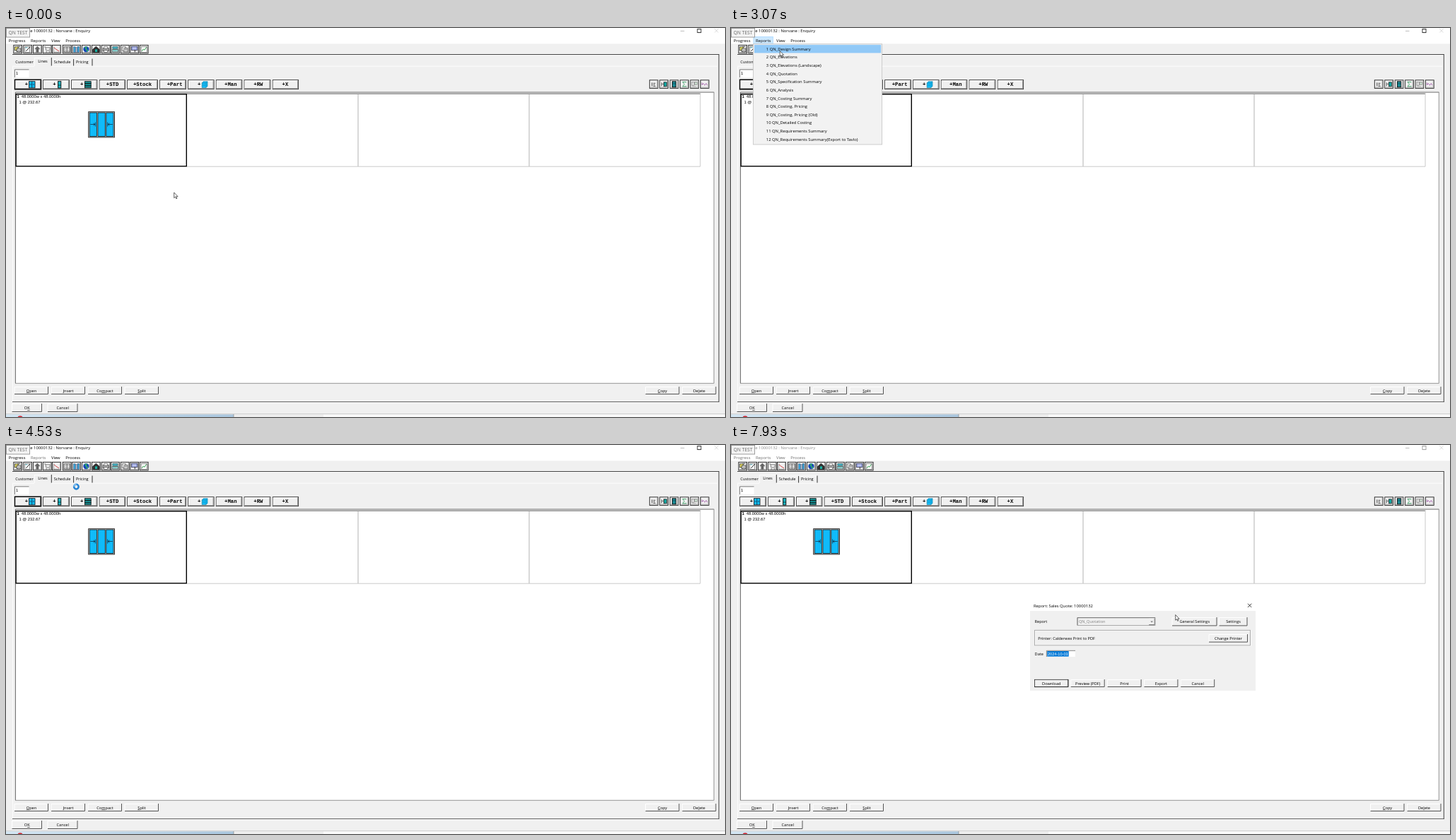
Recreate the animation shown at these times as an HTML page. Size 1017x551 px, loop 8 s.

```html
<!DOCTYPE html>
<html lang="en">
<head>
<meta charset="utf-8">
<title>Enquiry lines</title>
<style>
html, body { margin: 0; width: 100%; height: 100%; overflow: hidden; background: #fff; }
svg { display: block; width: 1017px; height: 551px; }
text { font-family: "Open Sans", "Noto Sans", sans-serif; font-size: 5.85px; white-space: pre; fill: #000; }
.ui { font-size: 5.6px; }
.cell { font-family: "Liberation Sans", Arial, sans-serif; font-size: 5.8px; }
.mono { font-family: "Liberation Mono", monospace; font-size: 7.3px; font-weight: 700; }
.mid { text-anchor: middle; }
.u { text-decoration: underline; }
.off .title { fill: #8a8a8a; }
.off .menu, .busy #reports { fill: #6d6d6d; }
.off #max { stroke: #999; }
.off #focus { visibility: hidden; }
</style>
</head>
<body>
<svg id="stage" viewBox="0 0 1017 551"></svg>
<script>
const FACE = '#f0f0f0', DARK = '#555', CYAN = '#10bbfa', TEAL = '#12a5a0';

const rect = (x, y, w, h, fill, stroke = 'none', sw = 1) =>
  `<rect x="${x}" y="${y}" width="${w}" height="${h}" fill="${fill}" stroke="${stroke}" stroke-width="${sw}"/>`;
const path = (d, stroke, sw = 1, fill = 'none') =>
  `<path d="${d}" stroke="${stroke}" stroke-width="${sw}" fill="${fill}"/>`;
const text = (x, y, s, cls = '', more = '') => `<text x="${x}" y="${y}" class="${cls}" ${more}>${s}</text>`;
const group = (id, body) => `<g id="${id}">${body}</g>`;
const at = (x, y, body) => `<g transform="translate(${x} ${y})">${body}</g>`;

// An underscore in a label marks its shortcut letter.
const button = (x, y, w, h, label) => rect(x, y, w, h, FACE) +
  path(`M${x} ${y + h}V${y + .5}H${x + w}`, '#fff') +
  path(`M${x} ${y + h - .5}H${x + w - .5}V${y}`, DARK) +
  text(x + w / 2, y + h / 2 + 2, label.replace(/_(.)/, '<tspan class="u">$1</tspan>'), 'ui mid');

const addButton = (x, w, label, tx) => rect(x + .6, 73.6, w - 1.2, 13, FACE, '#333', .9) +
  path(`M${x + 1.5} 86V74.6H${x + w - 1.5}`, '#fff', .8) +
  path(`M${x + 1.5} 85.7H${x + w - 1.6}V74.5`, '#777', .8) +
  text(tx, 82.3, label, 'mono');

const icon = (x, y, body) => at(x, y,
  rect(.5, .5, 11.8, 11.6, FACE, '#222', .9) + path('M1.5 10.8H11.4V1.5', '#999', .8) + body);

const glyphs = [
  rect(2, 3, 5, 5, '#e8df6a', '#222', .7) + rect(5, 5.2, 5.5, 4.6, '#fff', '#222', .8) + path('M6 2.5H10M6.3 7.5H9.5', '#222', .8),
  rect(2.5, 2.5, 6.5, 8, '#fff', '#555', .6) + path('M4 9L10 2.5', '#222', 1) + path('M3 4H6', '#29a', .8),
  path('M6.4 2L10 6H8V10.5H4.8V6H2.8Z', '#555', .4, '#666'),
  path('M2 3H4L5 8H10L10.5 4H4.4', '#666', .8) + path('M5 10H6M9 10H10', '#444', 1.2),
  path('M2.5 2.5V10.5H10.5', '#777', .7) + path('M3 4L6 6.5L10 9', '#c33', .9),
  rect(2.2, 3, 8.4, 7, '#fff', '#333', .8) + path('M6.4 3V10M3 5H10M3 7.5H10', '#333', .6),
  rect(2.3, 3, 2.6, 7.5, '#3aa9dd', '#346', .5) + rect(5.2, 4, 2.4, 6.5, '#bcd', '#346', .5) + rect(7.9, 2.5, 2.6, 8, '#3aa9dd', '#346', .5),
  '<circle cx="6.4" cy="6.3" r="4.2" fill="#1646b8"/>' + path('M4 4L7 3.5L6 6L8.5 8L7 9.5', '#33b06c', 1.5),
  path('M1.8 6.5L6.4 2.4L11 6.5V10.6H1.8Z', '#111', .8, '#333') + rect(5, 6.5, 3, 3.6, '#19b3a6'),
  rect(2.3, 5, 8.2, 4, '#aaa', '#333', .7) + rect(4, 2.4, 4.8, 2.8, '#fff', '#444', .6) + rect(4, 8, 4.8, 2.5, '#fff', '#444', .6),
  rect(2.8, 2.5, 7.2, 3, '#49b6c9', '#244', .6) + rect(2.2, 6.5, 8.4, 3.6, '#eee', '#244', .7) + path('M3 8.2H9.7', TEAL, 1),
  rect(2.5, 3, 5, 5.5, '#fff', '#444', .7) + rect(5, 5, 5.3, 5, '#ddd', '#444', .7) + path('M6 7H9.5', '#444', .6),
  rect(2.2, 2.3, 8.4, 5.3, '#8794df', '#334', .7) + path('M3.5 4.2H9.3M3.5 6H9.3', '#fff', .7) + path('M7 7V10.5', '#333', 1),
  rect(2.4, 2.5, 8, 8, '#fff', '#555', .6) + path('M3.5 9L5.5 6L7 7.5L9.7 3.5', '#2a9a46', 1)
];
const glyphX = [10.3, 24.3, 38, 51.8, 65, 79.8, 93.2, 107, 121, 134.8, 148, 161.8, 175.3, 188.8];

const sideGlyphs = [
  path('M4 4V9M5.8 5H8.6M5.8 7H8M5.8 9H8.8', '#333', .9),
  path('M3.2 4V9M4 6H6', '#333', .8) + rect(6.2, 3.5, 4, 6, TEAL, '#111', .7),
  rect(3.8, 2.5, 5.2, 8, '#1b9fa8', '#111', 1) + path('M4 5.5H9M6.4 3V10', '#134', .6),
  path('M8.8 4V3.2H4L6.5 6.3L4 9.5H9V8.6', '#2b9a5a', .8),
  rect(2.5, 3.2, 3.4, 5, '#ddd', '#777', .6) + rect(7, 3.2, 3, 4, '#cfe6d4', '#777', .6) + path('M3 9.5H9', '#888', .6),
  path('M2.5 4V7.5L4.5 5L6.5 8L8.5 5L10 8', '#a05aa8', .8)
];

const frame = () => rect(0, 0, 1017, 551, FACE) + rect(0, 0, 1017, 22.3, '#fff') +
  text(34.3, 6.2, 'e 10000132 : Norvane : Enquiry', 'title') +
  path('M954 4.3H959.5', '#aaa', .8) +
  '<rect id="max" x="978" y="1.5" width="5" height="5" fill="none" stroke="#222" stroke-width=".9"/>' +
  path('M1002.3 1.2L1007.5 6.4M1007.5 1.2L1002.3 6.4', '#ccc', .7) +
  group('menuHot', rect(31.9, 12.4, 27.4, 9.9, '#cce8ff', '#99d1ff', .6)) +
  text(3.8, 19.6, 'Progress', 'menu') + text(35, 19.6, 'Reports', 'menu', 'id="reports"') +
  text(64, 19.6, 'View', 'menu') + text(84.2, 19.6, 'Process', 'menu') +
  glyphs.map((g, i) => icon(glyphX[i], 23.8, g)).join('') +
  path('M9 37.5H1008.5', '#444') + path('M9 38.6H1007', '#fff', .8) +
  path('M1008.3 37V530', '#444') + path('M9 529.6H1008.6', '#555') + path('M9 530.6H1008.6', '#fff', .8) +
  path('M9.5 55V529', '#fff', .8);

const tabs = () => path('M9 54.2H40M64 54.2H1006', '#fff', .9) +
  path('M40.3 54V42.5H63.5M64.8 44H95M96 44H121.6', '#fff', .8) +
  path('M64.3 42V53.5M95.6 44V53.5M122 43.5V53.5', '#333') +
  text(13.2, 49.8, 'Customer', 'ui') + text(45.2, 49.2, 'Lines', 'ui') +
  text(67.7, 49.8, 'Schedule', 'ui') + text(99, 49.8, 'Pricing', 'ui') +
  rect(12, 58.5, 20.5, 11.5, '#fff') + path('M12.4 70V58.9H32.5', '#666', .9) + text(14, 66.4, '1', 'cell');

const addRow = () => {
  const row = [[12, 38, '+', 26.7], [52, 38, '+', 66.3], [92, 37.5, '+', 105], [131.7, 37.5, '+STD', 141.8],
    [171, 44, '+Stock', 179.9], [217, 38, '+Part', 227.7], [257, 37.7, '+', 271], [296.7, 37.7, '+Man', 309],
    [336.5, 38, '+RW', 350.3], [376.7, 37.5, '+X', 390.5]];
  return row.map(b => addButton(...b)).join('') +
    rect(32.4, 75.6, 8.6, 9.2, CYAN, '#111', .8) + path('M36.7 75.5V85M37.5 80H40M33.5 80H36', '#134', .8) +
    rect(73.6, 75.4, 4.2, 9.6, '#18b6c2', '#111', .9) + path('M73.6 81H78', '#111', .7) +
    rect(111.4, 75.6, 8.8, 9.2, '#14898c', '#111', .8) + path('M111 78.5H120.5M111 81.8H120.5', '#111', .9) +
    path('M277.2 78L279.2 75.8H285V82.3L283 84.6H277.2Z', '#1786a8', .7, CYAN) +
    path('M277.2 78H283V84.5M283 78L285 75.8M278 81H282', '#1786a8', .6) +
    group('focus', rect(12.5, 73.2, 37, 13.6, 'none', '#000', 1.4)) +
    sideGlyphs.map((g, i) => icon(909.8 + i * 14.42, 73.3, g)).join('');
};

const pane = x => rect(x, 120, 10.2, 33.6, CYAN, '#111', .75);
const grid = () => rect(13, 90.5, 988.5, 413, '#fff') +
  path('M13.4 503V91H1001.5', '#666') + path('M1001.3 91V503.3H13', '#8a8a8a', .9) +
  path('M14 93.2H982', '#777', 1.3) +
  path('M498 94V196M740 94V196', '#aaa', .9) + path('M982 92V196.2H256', '#c4c4c4', .9) +
  rect(14.1, 93.8, 241.2, 102, 'none', '#000', 1.4) +
  text(15.4, 99.4, '1', 'cell', 'font-weight="700"') + text(21.8, 99.4, '48.0000w x 48.0000h', 'cell') +
  text(18.5, 106.7, '1 @ 232.67', 'cell') +
  rect(116.7, 118.7, 36.8, 36.2, '#d0d0d0', '#111', .85) + [118.2, 130, 141.8].map(pane).join('') +
  path('M119.5 136.5H125.7M123.8 134.8L125.8 136.5L123.8 138.2M126.4 133.5V139.5', '#123', .7) +
  path('M150.7 136.5H144.4M146.3 134.8L144.3 136.5L146.3 138.2M143.7 133.5V139.5', '#123', .7);

const footer = () => [[12, '_Open'], [64, '_Insert'], [116, 'Co_mpact'], [168, '_Split'], [904.5, '_Copy'], [956.5, 'De_lete']]
    .map(([x, s]) => button(x, 508, 48, 11, s)).join('') +
  button(8.5, 532, 42.5, 12, 'O_K') + button(59, 532, 42.5, 12, 'Cancel') +
  path('M0 546.8H1017', '#bbb', .8) + rect(0, 547.4, 322, 4, 'url(#bar)') + rect(322, 547.4, 127, 4, '#eee') +
  rect(449, 547.4, 568, 4, '#fafafa') + path('M322 547V551', '#888', .7) +
  '<ellipse cx="20" cy="551" rx="3.2" ry="1.8" fill="#d22a35"/>';

const badge = () => rect(.4, .4, 33.2, 12.6, '#f3f3f3', '#888', .8) +
  text(17, 9.4, 'QN TEST', 'mid', 'style="font-size:6.7px;fill:#666"');

const PITCH = 11.636;
const reports = ['Design Summary', 'Elevations', 'Elevations (Landscape)', 'Quotation', 'Specification Summary',
  'Analysis', 'Costing Summary', 'Costing, Pricing', 'Costing, Pricing (Old)', 'Detailed Costing',
  'Requirements Summary', 'Requirements Summary(Export to Tavlo)'];
const dropdown = () => rect(31.4, 22.6, 182.2, 142.4, '#f2f2f2', '#c8c8c8', .9) +
  group('hot', rect(33, 23.8, 179.2, 11.6, '#91c9f7')) +
  reports.map((s, i) => text(49.8, 31.7 + i * PITCH, `${i + 1} QN_${s}`)).join('');

const dialog = () => rect(423, 220, 319, 128, FACE) + rect(423, 220, 319, 15, '#fff') +
  text(428, 229.7, 'Report: Sales Quote: 10000132') +
  path('M731 224.7L736.2 229.9M736.2 224.7L731 229.9', '#222', .9) +
  text(429.6, 252.2, 'Report', 'ui') +
  rect(490, 244.6, 110, 10.8, FACE, '#999', .8) + path('M490 255.2V244.7H600', '#666', .8) +
  text(492, 252.2, 'QN_Quotation', 'ui', 'style="fill:#808080"') +
  rect(591.2, 245.6, 8, 9, FACE) + path('M591.2 254.6H599.2V245.6', '#666', .9) + path('M593.3 249.5H597L595.15 251.5Z', 'none', 0, '#777') +
  button(624, 244, 63.5, 12.4, 'General Settings') + button(690.5, 244, 40, 12.4, 'Settings') +
  rect(430.2, 262.9, 305, 21.6, 'none', '#fff', .9) + rect(429.6, 262.3, 305, 21.6, 'none', '#999', .8) +
  text(434.3, 275.9, 'Printer: Calderwex Print to PDF', 'ui') + button(676, 268, 55, 11.6, 'Change Printer') +
  text(429.6, 297.7, 'Date', 'ui') + rect(446, 291, 41, 9, '#fff') + path('M446.4 300V291.3H487', '#666', .8) +
  rect(447.2, 292, 30.5, 7.6, '#0078d7') + text(448, 297.8, '2024-10-03', 'cell', 'style="fill:#fff;font-size:5.6px"') +
  [[429.3, 'Download'], [480.7, 'Preview (PDF)'], [532.6, 'Print'], [584.4, 'Export'], [636.2, 'Cancel']]
    .map(([x, s]) => button(x, 332, 48, 11, s)).join('') +
  rect(429.5, 332.3, 47.4, 10.4, 'none', '#222', .8);

const arrow = () => path('M0 0V7.7L1.8 6.1L3 8.8L4.2 8.3L3 5.7H5.4Z', '#222', .7, '#fff');
const ring = () => '<g fill="none"><circle r="3.3" stroke="#2583d4" stroke-width="2.5"/>' +
  '<circle id="arc" r="3.3" stroke="#7dbdf0" stroke-width="2" stroke-dasharray="5 15.73"/></g>';

stage.innerHTML = '<defs><linearGradient id="bar"><stop stop-color="#d3e6f3"/><stop offset="1" stop-color="#a9c6de"/></linearGradient></defs>' +
  frame() + tabs() + addRow() + grid() + footer() + group('drop', dropdown()) + badge() +
  group('dialog', dialog()) + group('wait', ring()) + group('pointer', arrow());

const $ = id => document.getElementById(id);
const show = (id, on) => $(id).setAttribute('visibility', on ? 'inherit' : 'hidden');
const move = (id, x, y) => $(id).setAttribute('transform', `translate(${x} ${y})`);

const LOOP = 8000, RATE = .015;
// time, x, y of the pointer tip
const route = [[0, 237.7, 233], [333, 234.5, 187], [467, 234.5, 187], [800, 150, 114], [1133, 79.5, 41],
  [1333, 58.8, 26], [1600, 51.5, 15.5], [2800, 51.5, 15.5], [3133, 75, 38], [3400, 99.3, 60.3],
  [6467, 100, 60.3], [6533, 106, 61], [6933, 300, 140], [7333, 526, 231.3], [7600, 600, 238], [7933, 628.7, 240.5]];
const hotTimes = [3070, 3200, 3330, 3530];

const slope = (i, n) => (route[i + 1][n] - route[i][n]) / (route[i + 1][0] - route[i][0]);

// Speed at a route point: none at rests and turns, else a mean of both sides.
function speed(i, n) {
  if (i < 1 || i > route.length - 2) return 0;
  const a = slope(i - 1, n), b = slope(i, n);
  return a * b > 0 ? 2 * a * b / (a + b) : 0;
}

function tip(t) {
  const i = route.findIndex(p => p[0] > t) - 1;
  if (i < 0) return route[route.length - 1].slice(1);
  const [a, b] = [route[i], route[i + 1]], d = b[0] - a[0], k = (t - a[0]) / d, r = 1 - k;
  return [1, 2].map(n => a[n] * r * r * (1 + 2 * k) + b[n] * k * k * (3 - 2 * k) +
    d * k * r * (speed(i, n) * r - speed(i + 1, n) * k));
}

function draw(ms) {
  const shown = Math.floor((ms + 4) * RATE) / RATE, t = shown + 4;
  const open = t >= 2000 && t < 4070, waiting = t >= 4070 && t < 5930;
  stage.classList.toggle('off', (t >= 200 && t < 2000) || t >= 4730);
  stage.classList.toggle('busy', t >= 4070);
  show('menuHot', open);
  show('drop', open);
  const row = hotTimes.filter(h => t >= h).length - 1;
  show('hot', open && row >= 0);
  move('hot', 0, Math.max(row, 0) * PITCH);
  show('dialog', t >= 5870);
  show('wait', waiting);
  show('pointer', !waiting);
  move('wait', 99.4, 59.1);
  $('arc').setAttribute('transform', `rotate(${(shown - 4070) * .4})`);
  move('pointer', ...tip(shown));
}

const start = performance.now();
function tick() {
  draw((performance.now() - start) % LOOP);
  requestAnimationFrame(tick);
}
tick();
</script>
</body>
</html>
```
